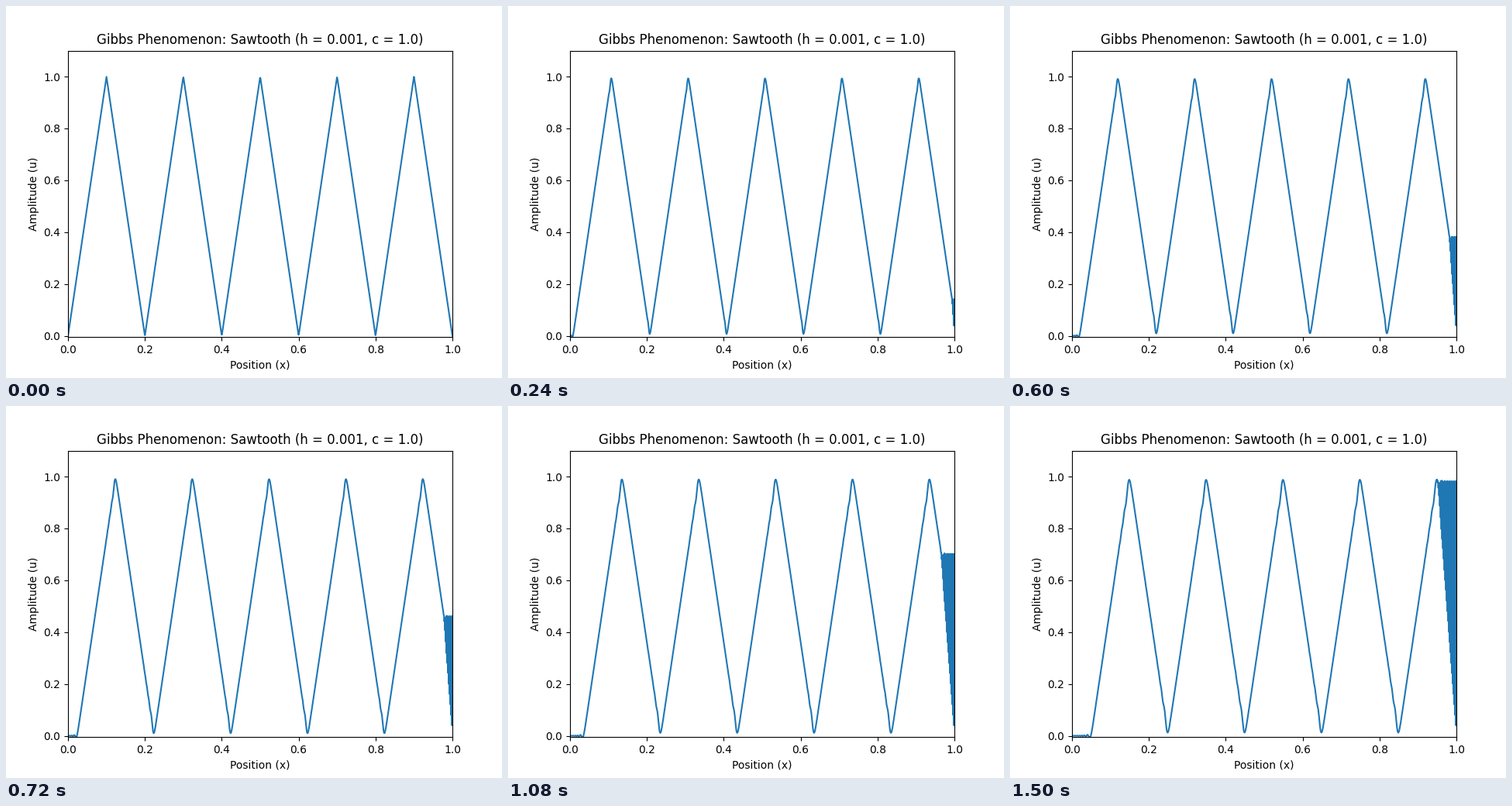
These frames come from a looping animation (640x480 px, 1.53 s). A matplotlib script:

```python
import numpy as np
import matplotlib.pyplot as plt
from matplotlib.animation import FuncAnimation

H, C = 0.001, 1.0
FRAMES, INTERVAL = 51, 30
SUBSTEPS = 100                     # solver steps per displayed frame
DT = H / SUBSTEPS


def triangle_wave(x):
    return 1 - np.abs((10 * x) % 2 - 1)


def solve(u):
    """Advect u with central differences, zero beyond both ends."""
    padded = np.zeros(u.size + 2)
    inner = padded[1:-1]
    inner[:] = u
    k = C * DT / (2 * H)
    states = [u.copy()]
    for _ in range(FRAMES - 1):
        for _ in range(SUBSTEPS):
            inner -= k * (padded[2:] - padded[:-2])
        states.append(inner.copy())
    return states


x = np.linspace(0, 1, round(1 / H))
states = solve(triangle_wave(x))

fig, ax = plt.subplots(figsize=(6.4, 4.8), dpi=100)
line, = ax.plot(x, states[0])
ax.set_xlim(0, 1)
ax.set_ylim(-0.005, 1.1)
ax.set_xlabel("Position (x)")
ax.set_ylabel("Amplitude (u)")
ax.set_title(f"Gibbs Phenomenon: Sawtooth (h = {H}, c = {C})")


def update(i):
    line.set_ydata(states[i])
    return line,


anim = FuncAnimation(fig, update, frames=FRAMES, interval=INTERVAL,
                     repeat=True, repeat_delay=0)
plt.show()
```
